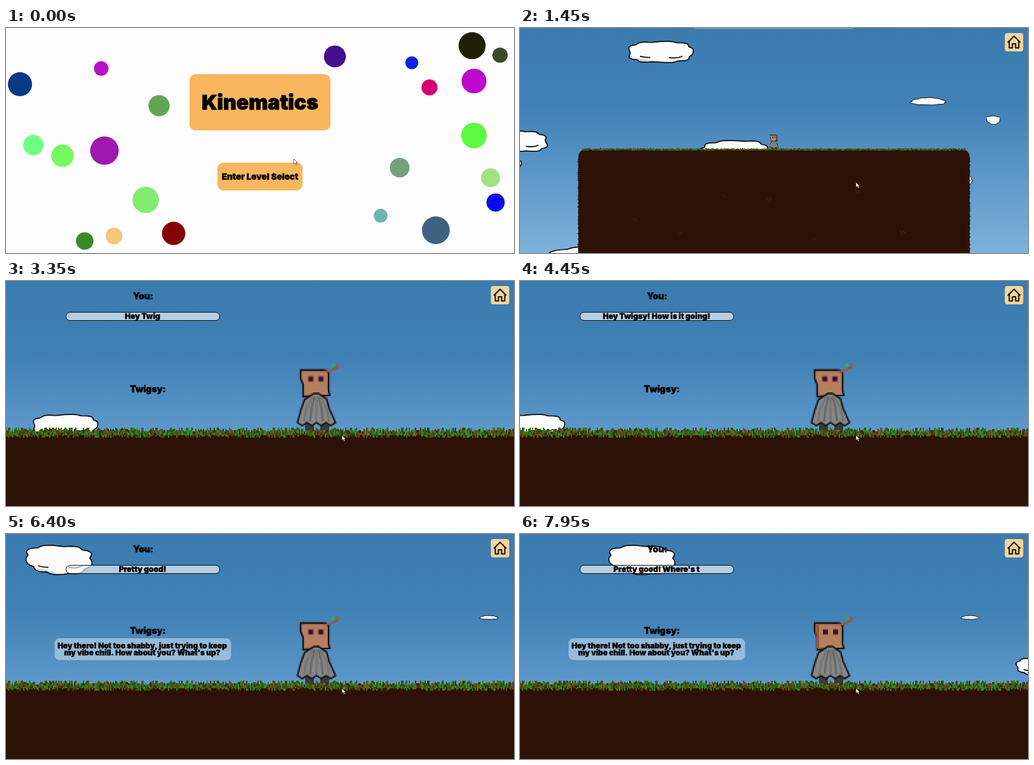
Animation, 800 px wide and 356 px high, one loop 8000 ms. Source, as an HTML page with a canvas:

```html
<!DOCTYPE html>
<html lang="en">
<head>
<meta charset="utf-8">
<title>Kinematics</title>
<style>
html, body { margin: 0; height: 100%; overflow: hidden; background: #fdfdfd; }
canvas { display: block; width: 100vw; height: 100vh; }
</style>
</head>
<body>
<canvas id="stage" width="800" height="356"></canvas>
<script>
const LOOP = 8000, ZOOM = 4.36, CX = 400, CY = 178;
const ctx = document.getElementById('stage').getContext('2d');

const clamp = v => Math.max(0, Math.min(1, v));
const ease = (t, from, to) => { const p = clamp((t - from) / (to - from)); return p * p * (3 - 2 * p); };
const random = seed => {
  let s = seed * 48271 % 2147483647;
  return () => (s = s * 16807 % 2147483647) / 2147483647;
};

function box(x, y, w, h, r, fill, stroke) {
  ctx.beginPath();
  ctx.roundRect(x, y, w, h, r);
  ctx.fillStyle = fill;
  ctx.fill();
  if (stroke) { ctx.strokeStyle = stroke; ctx.lineWidth = 1; ctx.stroke(); }
}

function label(str, x, y, size) {
  ctx.font = `900 ${size}px Inter, "Open Sans", sans-serif`;
  ctx.textAlign = 'center';
  ctx.textBaseline = 'middle';
  ctx.fillStyle = ctx.strokeStyle = '#000';
  ctx.lineWidth = size * 0.03;
  ctx.fillText(str, x, y);
  ctx.strokeText(str, x, y);
}

function polygon(c, points, fill, stroke, width) {
  c.beginPath();
  points.forEach(([x, y]) => c.lineTo(x, y));
  c.closePath();
  c.fillStyle = fill;
  c.fill();
  if (stroke) { c.strokeStyle = stroke; c.lineWidth = width; c.stroke(); }
}

function offscreen(w, h) {
  const c = document.createElement('canvas');
  c.width = w;
  c.height = h;
  return c;
}

// Balls from the largest to the smallest: x, y, colour
const balls = [
  [155, 194, '#a018ad'], [677, 320, '#406280'], [734, 28, '#20200a'], [220, 272, '#83ec70'],
  [737, 170, '#5cfa40'], [737, 84, '#bd0acc'], [22, 89, '#063a85'], [264, 325, '#850003'],
  [89, 202, '#76fa60'], [518, 45, '#430f8c'], [241, 123, '#62a553'], [43, 185, '#70ff82'],
  [620, 221, '#72a378'], [763, 237, '#a0e283'], [771, 276, '#0c0cea'], [124, 337, '#398a25'],
  [170, 329, '#f6c679'], [667, 94, '#d50074'], [778, 43, '#3d4a2a'], [150, 64, '#b811c9'],
  [590, 297, '#6eb5b2'], [639, 55, '#0c23dd']
];

function drawTitle(t) {
  ctx.fillStyle = '#fdfdfd';
  ctx.fillRect(0, 0, 800, 356);
  balls.forEach(([x, y, color], i) => {
    const angle = i * 2.4, drift = t * 0.04;
    ctx.beginPath();
    ctx.arc(x + Math.cos(angle) * drift, y + Math.sin(angle) * drift, 22.5 - i * 0.58, 0, 7);
    ctx.fillStyle = color;
    ctx.fill();
  });
  box(289, 73, 222, 89, 10, '#f9b65e');
  label('Kinematics', 400, 119, 32);
  box(333, 213, 134, 44, 9, '#f9b65e');
  label('Enter Level Select', 400, 236, 13.5);
}

// Each cloud: x and y at 700 ms, width, direction. Wider clouds drift faster.
const cloudKinds = [
  { aspect: 0.36, power: 0.7, taper: 0, bumps: 9,
    at: [[272, 52, 95, -1], [282, 211, 104, 1], [310, 271, 47, 1], [274, 352, 36, 1], [-52, 193, 90, 1]] },
  { aspect: 0.68, power: 0.8, taper: 0.35, bumps: 7,
    at: [[768, 160, 20, -1], [5, 236, 56, -1], [370, 269, 33, 1], [721, 258, 33, -1]] },
  { aspect: 0.24, power: 0.9, taper: -0.25, bumps: 9,
    at: [[609, 130, 50, 1], [381, 345, 152, -1], [38, 379, 152, 1], [948, -44, 26, -1]] },
  { aspect: 0.46, power: 0.8, taper: 0.1, bumps: 9,
    at: [[534, 334, 27, 1], [-315, -135, 100, 1], [1176, 33, 60, -1]] }
];
const clouds = cloudKinds.flatMap(kind => kind.at.map(([x, y, w, dir]) =>
  ({ x, y, w, h: w * kind.aspect, speed: dir * (20 + w / 2), shape: cloudShape(w, kind) })));

function cloudShape(w, { aspect, power, taper, bumps }) {
  const path = new Path2D(), rnd = random(w * 31), phase = rnd() * 3;
  const lobe = v => Math.sign(v) * Math.abs(v) ** power;
  for (let i = 0; i < 72; i++) {
    const a = i / 72 * Math.PI * 2;
    const r = 0.93 + 0.1 * Math.abs(Math.sin(a * bumps / 2 + phase)) + 0.05 * Math.sin(2 * a + phase) + 0.015 * rnd();
    const y = lobe(Math.sin(a)) * r;
    path.lineTo(lobe(Math.cos(a)) * r * (1 - taper * y) * w / 2, y * w * aspect / 2);
  }
  path.closePath();
  return path;
}

function drawClouds(t, shift) {
  for (const { x, y, w, h, speed, shape } of clouds) {
    ctx.save();
    ctx.translate(x + speed * (t - 700) / 1000, y + shift);
    ctx.fillStyle = '#fbfbfb';
    ctx.fill(shape);
    ctx.save();
    ctx.clip(shape);
    ctx.fillStyle = '#d2d2d2';
    ctx.beginPath();
    ctx.ellipse(-w * 0.3, h * 0.48, w * 0.28, h * 0.16, 0.1, 0, 7);
    ctx.fill();
    ctx.restore();
    ctx.strokeStyle = '#0a0a0a';
    ctx.lineWidth = w > 55 ? 1.7 : 1;
    ctx.stroke(shape);
    if (h > 15) {
      ctx.beginPath();
      ctx.moveTo(-w * 0.34, h * 0.2);
      ctx.quadraticCurveTo(-w * 0.25, h * 0.26, -w * 0.17, h * 0.25);
      ctx.moveTo(w * 0.14, h * 0.25);
      ctx.quadraticCurveTo(w * 0.26, h * 0.32, w * 0.36, h * 0.2);
      ctx.stroke();
    }
    ctx.restore();
  }
}

// Grass blades, one canvas pixel per cell
const grass = (() => {
  const strip = offscreen(1340, 8), c = strip.getContext('2d'), rnd = random(4242);
  const colors = ['#2c7a1c', '#1f5a14', '#5c4e16', '#47470f', '#664a18', '#358c26', '#3a2a0c'];
  for (let x = 0; x < strip.width; x++) {
    const bottom = 5 + rnd() * 3;
    for (let y = Math.floor(rnd() * 3.5); y < bottom; y += 2) {
      c.fillStyle = colors[Math.floor(rnd() * colors.length)];
      c.fillRect(x, y, 1, Math.min(2, Math.ceil(bottom - y)));
    }
  }
  return strip;
})();

// Character, origin between the feet, drawn at half size and enlarged for square pixels
function sprite(shaded) {
  const image = offscreen(40, 60), c = image.getContext('2d');
  const line = (points, color, width) => {
    c.beginPath();
    points.forEach(([x, y]) => c.lineTo(x, y));
    c.strokeStyle = color;
    c.lineWidth = width;
    c.stroke();
  };
  const rect = (x, y, w, h, color) => { c.fillStyle = color; c.fillRect(x, y, w, h); };
  c.scale(0.5, 0.5);
  c.translate(36, 112);

  for (const x of [-18, 6]) rect(x, -14, 14, 12, '#3a3a3a');
  polygon(c, [[-25, -97], [14, -97], [19, -93], [19, -64], [21, -57], [-21, -55], [-21, -74], [-25, -84]], '#b5805f', '#120b08', 2.6);
  if (shaded) rect(-23, -95, 5, 38, '#935738');

  const cloak = [[-4, -60], [3, -60], [16, -51], [20, -36]];
  for (let i = 0; i <= 8; i++) cloak.push([30 - i * 7.5, i % 2 ? -9 : -14]);
  cloak.push([-25, -33], [-19, -50]);
  polygon(c, cloak, '#868686', '#151515', 2.6);
  for (let i = -2; i <= 2; i++) {
    const spread = i * (shaded ? 9 : 10);
    line([[i * 3, -55], [spread * 0.8, -36], [spread, -16]], i % 2 ? '#656565' : '#737373', 3);
  }

  const look = shaded ? 1 : 0;
  for (const x of [-13, 3]) rect(x + look, -87, 8, 8, '#3b1035');
  line([[11, -95], [21, -95], [27, -99], [33, -101], [33, -107]], '#a5522f', 3);
  line([[31, -103], [38, -104]], '#b0602f', 2);
  rect(23, -107, 5, 4, '#35b52a');
  return image;
}
const sprites = [sprite(true), sprite(false)];

function drawGround() {
  box(-308, 13.8, 616, 400, [12, 12, 0, 0], '#2e1106');
  ctx.fillStyle = '#1b1a08';
  const rnd = random(77);
  for (let y = 26; y < 180; y += 3)
    for (const side of [-308, 308]) ctx.fillRect(side - rnd() * 1.5, y, 1.5, 2);
  ctx.fillStyle = '#5d5048';
  for (let x = -223; x < 260; x += 70) {
    const y = 45 + rnd() * 110;
    for (let i = 0; i < 5; i++) ctx.fillRect(x + i * 2, y + i * 7 % 5, 0.9, 0.9);
  }
  ctx.imageSmoothingEnabled = false;
  ctx.drawImage(grass, -302, 12.3, 604, 3.7);
}

const message = ['Congrats! You made it to the', "last level. You've done enough",
  'physics, how about you just', 'talk to Twigsy for a while?'];

// The panel unrolls from its middle
function drawPanel(t) {
  const full = 76, h = full * ease(t, 550, 820);
  ctx.save();
  ctx.translate(0, -215 - h / 2);
  ctx.beginPath();
  ctx.rect(-130, 0, 260, h);
  ctx.clip();
  box(-130, 0, 260, full, 8, 'rgba(255,255,255,.45)');
  message.forEach((line, i) => label(line, -1, 14 + i * 15.4, 16.5));
  ctx.restore();
}

function drawHome() {
  box(763.5, 8, 29, 29, 4, '#f5d499');
  ctx.strokeStyle = '#111';
  ctx.lineWidth = 2;
  ctx.lineJoin = 'round';
  ctx.stroke(new Path2D('M768 23L778 13L788 23M770.5 21V31.5H775.5V25H780.5V31.5H785.5V21'));
}

// Characters typed so far, one every `step` ms from `start`
const typed = (str, t, start, step) => str.slice(0, Math.max(0, Math.floor((t - start) / step)));

function drawChat(t) {
  if (t < 2850) return;
  const replied = t >= 5000;
  const input = t < 4700
    ? typed('Hey Twigsy! How is it going!', t, 2950, 50)
    : typed('Pretty good!', t, 5400, 75) + typed(" Where's t", t, 7150, 75);
  label('You:', 216, 25, 14);
  box(94.5, 49.5, 242, 13, 6.5, 'rgba(255,255,255,.62)', '#111');
  label(input, 215, 56, 12);
  label('Twigsy:', 223.5, replied ? 154 : 172, 14);
  if (!replied) return;
  box(76.5, 165, 278, 34.5, 8, 'rgba(255,255,255,.4)');
  label('Hey there! Not too shabby, just trying to keep', 214.5, 177, 11.8);
  label("my vibe chill. How about you? What's up?", 214.5, 188, 11.8);
}

function drawLevel(t) {
  const sky = ctx.createLinearGradient(0, 0, 0, 356);
  ['#3b7bb0', '#3f80b5', '#5e98ca', '#7db2da'].forEach((color, i) => sky.addColorStop(i / 3, color));
  ctx.fillStyle = sky;
  ctx.fillRect(0, 0, 800, 356);

  const scroll = ease(t, 900, 1420), zoomIn = ease(t, 1680, 2260);
  const zoom = ZOOM ** zoomIn;
  const inWorld = draw => {
    ctx.save();
    ctx.translate(CX + 88.5 * ease(t, 2650, 3050), CY);
    ctx.scale(zoom, zoom);
    ctx.translate(0, 215 * (1 - scroll));
    draw();
    ctx.restore();
  };
  inWorld(() => drawPanel(t));
  drawClouds(t, -14 * scroll + 190 * zoomIn);
  inWorld(() => {
    drawGround();
    ctx.translate(0, 13.8);
    ctx.scale(1 / ZOOM, 1 / ZOOM);
    const pose = Math.floor((t + 150) / 500) % 2;
    ctx.drawImage(sprites[pose], -36, -112, 80, 120);
  });
  drawHome();
  drawChat(t);
}

function drawCursor(t) {
  const p = ease(t, 100, 380);
  ctx.save();
  ctx.translate(453 + 76 * p, 207 + 37 * p);
  polygon(ctx, [[0, 0], [0, 8], [2, 6.5], [3.5, 9.5], [5, 9], [3.8, 6], [6, 6]], '#fff', '#222', 0.7);
  ctx.restore();
}

function frame() {
  const t = performance.now() % LOOP;
  if (t < 400) drawTitle(t); else drawLevel(t);
  drawCursor(t);
  requestAnimationFrame(frame);
}
frame();
</script>
</body>
</html>
```
